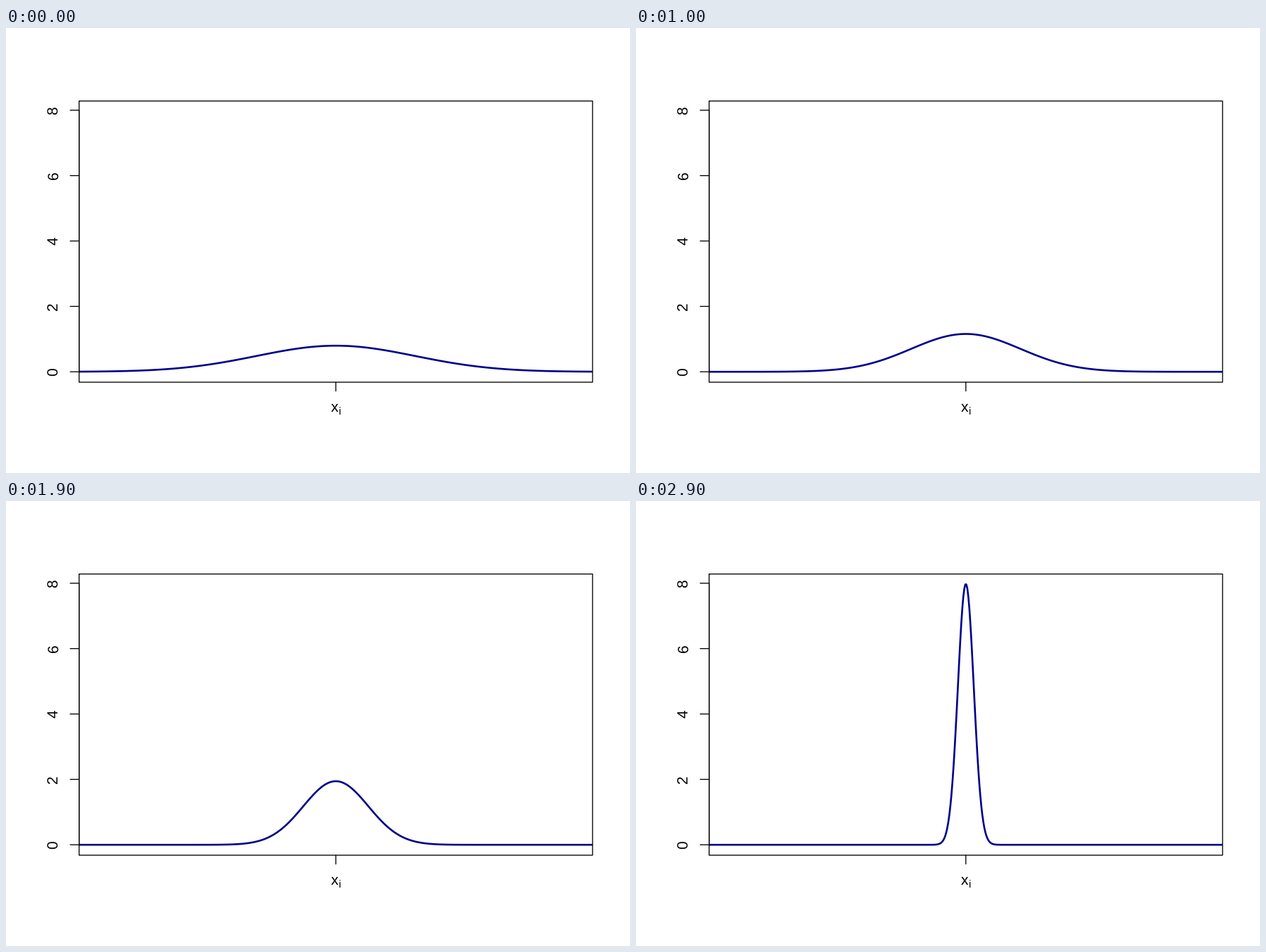
Animation, 885 px wide and 632 px high, one loop 3 s. Source, as a matplotlib script:

```python
import numpy as np
import matplotlib.pyplot as plt
from matplotlib.animation import FuncAnimation
from matplotlib.patches import Rectangle

W, H, DPI = 885, 632, 100
FRAMES, INTERVAL = 30, 100
INCH = W / 7              # pixels per inch of the 7 x 5 inch page
LINE = 0.2 * INCH         # one margin line
FONT = INCH / 6           # 12 pt text
STROKE = INCH / 96        # line of weight 1

LEFT, RIGHT = 4.1 * LINE, W - 2.1 * LINE
TOP, BOTTOM = 4.1 * LINE, H - 5.1 * LINE
MID = (LEFT + RIGHT) / 2

plt.rcParams["font.family"] = "Liberation Sans"
plt.rcParams["text.hinting"] = "none"
plt.rcParams["path.simplify"] = False


def pt(px):
    return px * 72 / DPI


def density(x, sigma):
    return np.exp(-0.5 * (x / sigma) ** 2) / (sigma * np.sqrt(2 * np.pi))


grid = np.linspace(-np.pi, np.pi, 1000)
sigmas = np.linspace(0.5, 0.05, FRAMES)
peak = density(grid, sigmas[-1]).max()

# The box adds 4 % on every side of the data range.
x_unit = (RIGHT - LEFT) / (3 * 1.08)
y_unit = (BOTTOM - TOP) / (peak * 1.08)


def to_x(x):
    return MID + x * x_unit


def to_y(y):
    return BOTTOM - (y + 0.04 * peak) * y_unit


fig = plt.figure(figsize=(W / DPI, H / DPI), dpi=DPI, facecolor="white")
ax = fig.add_axes([0, 0, 1, 1])
ax.set_xlim(0, W)
ax.set_ylim(H, 0)
ax.axis("off")


def line(xs, ys, weight=1, color="black", z=2):
    return ax.plot(xs, ys, color=color, lw=pt(weight * STROKE), zorder=z,
                   snap=False, solid_capstyle="round",
                   solid_joinstyle="round")[0]


def label(x, y, text, size=FONT, **style):
    ax.text(x, y, text, size=pt(size), va="baseline",
            rotation_mode="anchor", **style)


curve = line([], [], weight=2, color="#00008B", z=1)
clip = Rectangle((LEFT, TOP), RIGHT - LEFT, BOTTOM - TOP,
                 transform=ax.transData)
curve.set_clip_path(clip)

# Box and axes
line([LEFT, RIGHT, RIGHT, LEFT, LEFT], [TOP, TOP, BOTTOM, BOTTOM, TOP])
line([LEFT, LEFT], [to_y(0), to_y(8)])
for value in range(0, 9, 2):
    y = to_y(value)
    line([LEFT - LINE / 2, LEFT], [y, y])
    label(LEFT - 1.2 * LINE, y, str(value), ha="center", rotation=90)
line([MID, MID], [BOTTOM, BOTTOM + LINE / 2])

# Letter with subscript, centred under the tick
sub_size = 0.7 * FONT
x_width, i_width = 0.5 * FONT, 0.222 * sub_size
start = MID - (x_width + i_width) / 2
sub_base = BOTTOM + 1.8 * LINE
label(start, sub_base - 0.15 * FONT, "x", ha="left")
label(start + x_width, sub_base, "i", size=sub_size, ha="left")


def draw(frame):
    curve.set_data(to_x(grid), to_y(density(grid, sigmas[frame])))
    return (curve,)


anim = FuncAnimation(fig, draw, frames=FRAMES, interval=INTERVAL,
                     repeat=True, repeat_delay=0, blit=False)
plt.show()
```
